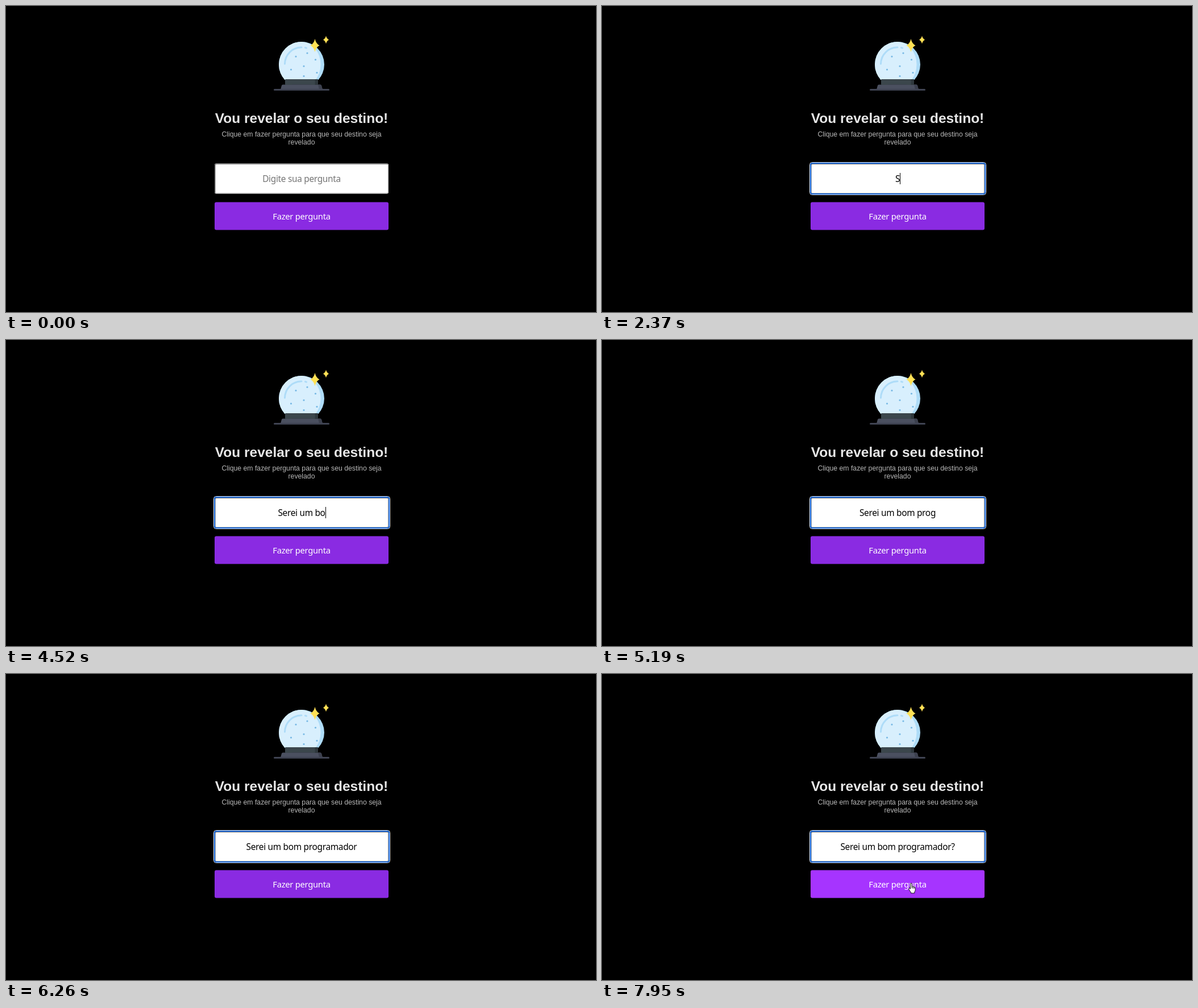
These frames come from a looping animation (1038x539 px, 8 s). An HTML page:

```html
<!DOCTYPE html>
<html lang="pt-BR">
<head>
<meta charset="utf-8">
<title>Vou revelar o seu destino!</title>
<style>
  html, body { margin: 0; width: 100%; height: 100%; overflow: hidden; background: #000; }
  svg { display: block; width: 1038px; height: 539px; }
  text { text-anchor: middle; white-space: pre; }
  .plain { font-family: "Liberation Sans", Arial, sans-serif; }
  .form { font-family: "Noto Sans", Tahoma, sans-serif; letter-spacing: -0.3px; }
</style>
</head>
<body>
<svg viewBox="0 0 1038 539">
  <defs>
    <clipPath id="aboveBase"><rect x="470" y="50" width="100" height="80"/></clipPath>
  </defs>

  <!-- crystal ball -->
  <g clip-path="url(#aboveBase)">
    <circle cx="520" cy="103" r="40" fill="#aedcf8"/>
    <path d="M520 63A40 40 0 0 0 520 143A33.5 40 0 0 0 520 63Z" fill="#d8effd"/>
  </g>
  <g fill="none" stroke="#aedcf8" stroke-width="3" stroke-linecap="round">
    <path d="M490.5 102A29.5 29.5 0 0 1 520 72.8"/>
    <path d="M526.5 73.4L528.5 74"/>
  </g>
  <g id="dots" fill="#76b8e4"></g>
  <path d="M483 147L485 140Q485.5 138.500 487 138.500H553Q554.500 138.500 555 140L557 147Z" fill="#4b5060"/>
  <path d="M549 138.500H553Q554.500 138.500 555 140L557 147H551Z" fill="#3c404e"/>
  <rect x="491" y="129" width="58" height="10" rx="1" fill="#3b464c"/>
  <path d="M543.500 129H549V139H543.500Z" fill="#2f383d"/>
  <path d="M503 138.500H536" stroke="#3c404e"/>
  <rect x="471" y="146" width="98" height="3" rx="1.500" fill="#3f4352"/>
  <g fill="#ffe155">
    <path d="M543.500 58Q545.500 66.500 551.500 69.500Q545.500 72.500 543.500 81Q541.500 72.500 535.500 69.500Q541.500 66.500 543.500 58Z"/>
    <path d="M563 52.500Q564.200 57.500 568 59.500Q564.200 61.500 563 66.500Q561.800 61.500 558 59.500Q561.800 57.500 563 52.500Z"/>
  </g>

  <g class="plain">
    <text x="520" y="206" font-size="24.5" font-weight="700" fill="#e6e6e6">Vou revelar o seu destino!</text>
    <g font-size="12.25" fill="#b8b8b8">
      <text x="520" y="230">Clique em fazer pergunta para que seu destino seja</text>
      <text x="520" y="244">revelado</text>
    </g>
  </g>

  <!-- question field -->
  <rect x="367" y="277.500" width="306" height="53" rx="3" fill="#fff"/>
  <rect x="367.750" y="278.250" width="304.500" height="51.500" rx="2.500" fill="none" stroke="#c4c4c4" stroke-width="1.500"/>
  <path d="M367.750 329V280.500Q367.750 278.250 370 278.250H672" fill="none" stroke="#767676" stroke-width="1.500"/>
  <g id="ring" fill="none">
    <rect x="365.500" y="275.500" width="310" height="57" rx="4" stroke="#e4f0ff"/>
    <rect x="367" y="277" width="307" height="54" rx="3" stroke="#1763d2" stroke-width="2"/>
  </g>
  <text id="question" class="form" x="520" y="310.300" font-size="15.4"></text>
  <rect id="caret" y="294" width="1" height="20"/>

  <rect id="button" x="367" y="345.500" width="306" height="49" rx="3"/>
  <text class="form" x="520" y="376" font-size="14.8" fill="#fff">Fazer pergunta</text>

  <!-- pointers, hot spot at the origin -->
  <g id="ibeam" fill="none" stroke="#222">
    <path d="M-3 -6.500H-1L0 -5.500L1 -6.500H3M0 -5.500V5.500M-3 6.500H-1L0 5.500L1 6.500H3"/>
  </g>
  <path id="arrow" d="M0 0V12.500L2.900 9.800L4.900 14.300L6.900 13.400L5 9.100H9Z"
        fill="#fff" stroke="#000" stroke-width=".8"/>
  <g id="hand" stroke="#000" stroke-width=".9" stroke-linejoin="round">
    <path d="M-1.500 9.500V.800Q-1.500 -.500 -.200 -.500Q1.100 -.500 1.100 .800V5Q2.400 4.300 3.200 5.600Q4.600 4.900 5.300 6.300Q7 5.800 7.200 7.800V11.500Q7 13.500 5.800 15V17H-.500V15.500Q-2.500 13.500 -4.200 9.800Q-4.600 8.300 -3.300 8.200Q-2.300 8.300 -1.500 9.500Z" fill="#fff"/>
    <path d="M1.100 5V8.500M3.200 5.600V8.800M5.300 6.300V9" fill="none"/>
  </g>
</svg>
<script>
const LOOP = 8000, STEP = 68, FOCUS = 1370;
const QUESTION = "Serei um bom programador?";
const keyTimes = [
  2370, 2440, 2570, 2770, 3500, 3600, 4040, 4250, 4310, 4450, 4520, 4660, 4730,
  4870, 4930, 5060, 5190, 5260, 5330, 5460, 5530, 5600, 5660, 5800, 6330
];
const caretOff = [[1910, 2370], [2970, 3500], [5190, 5260], [6260, 6330], [6790, 7320], [7950, LOOP]];

// Pointer paths as [time, x, y]; each one ends at its hide time.
const paths = [
  { hide: keyTimes[0], points: [[280, 996, 528], [480, 870, 425], [690, 695, 325], [860, 575, 286], [1030, 503, 280], [1232, 487.5, 299.5]] },
  { hide: LOOP, points: [[7140, 487.5, 299.5], [7480, 513, 335], [7820, 544, 369]] }
];

const el = id => document.getElementById(id);
const [ring, question, caret, button] = ["ring", "question", "caret", "button"].map(el);
const pointers = ["ibeam", "arrow", "hand"].map(el);
const show = (node, visible) => node.style.display = visible ? "" : "none";

el("dots").innerHTML = [[530, 83], [510, 89], [544.5, 94.5], [524, 106], [501.5, 112], [547, 117.5], [524, 123.5]]
  .map(([x, y]) => `<circle cx="${x}" cy="${y}" r="1.6"/>`).join("");

function pointerAt(time) {
  const path = paths.find(p => time >= p.points[0][0] && time < p.hide);
  if (!path) return null;
  const { points } = path, start = points[0][0];
  const t = start + Math.floor((time - start) / STEP) * STEP;
  const next = points.findIndex(p => p[0] > t);
  if (next < 0) return points.at(-1).slice(1);
  const [t0, x0, y0] = points[next - 1], [t1, x1, y1] = points[next];
  const k = (t - t0) / (t1 - t0);
  return [x0 + (x1 - x0) * k, y0 + (y1 - y0) * k];
}

function drawPointer(time) {
  const pos = pointerAt(time);
  const inside = (top, bottom) => pos && pos[0] >= 367 && pos[0] <= 673 && pos[1] >= top && pos[1] <= bottom;
  const overField = inside(278, 330), overButton = inside(346, 395);
  const shape = overField ? "ibeam" : overButton ? "hand" : "arrow";
  for (const p of pointers) {
    show(p, pos && p.id === shape);
    if (pos) p.setAttribute("transform", `translate(${pos})`);
  }
  button.setAttribute("fill", overButton ? "#a634ff" : "#8a2be2");
}

function draw(time) {
  const typed = QUESTION.slice(0, keyTimes.filter(t => t <= time).length);
  question.textContent = typed || "Digite sua pergunta";
  question.setAttribute("fill", typed ? "#000" : "#757575");
  const width = typed ? question.getComputedTextLength() : 0;
  caret.setAttribute("x", Math.round(520 + width / 2));
  show(caret, time >= FOCUS && !caretOff.some(([a, b]) => time >= a && time < b));
  show(ring, time >= FOCUS);
  drawPointer(time);
}

const begin = performance.now();
function tick() {
  draw((performance.now() - begin) % LOOP);
  requestAnimationFrame(tick);
}
tick();
</script>
</body>
</html>
```
